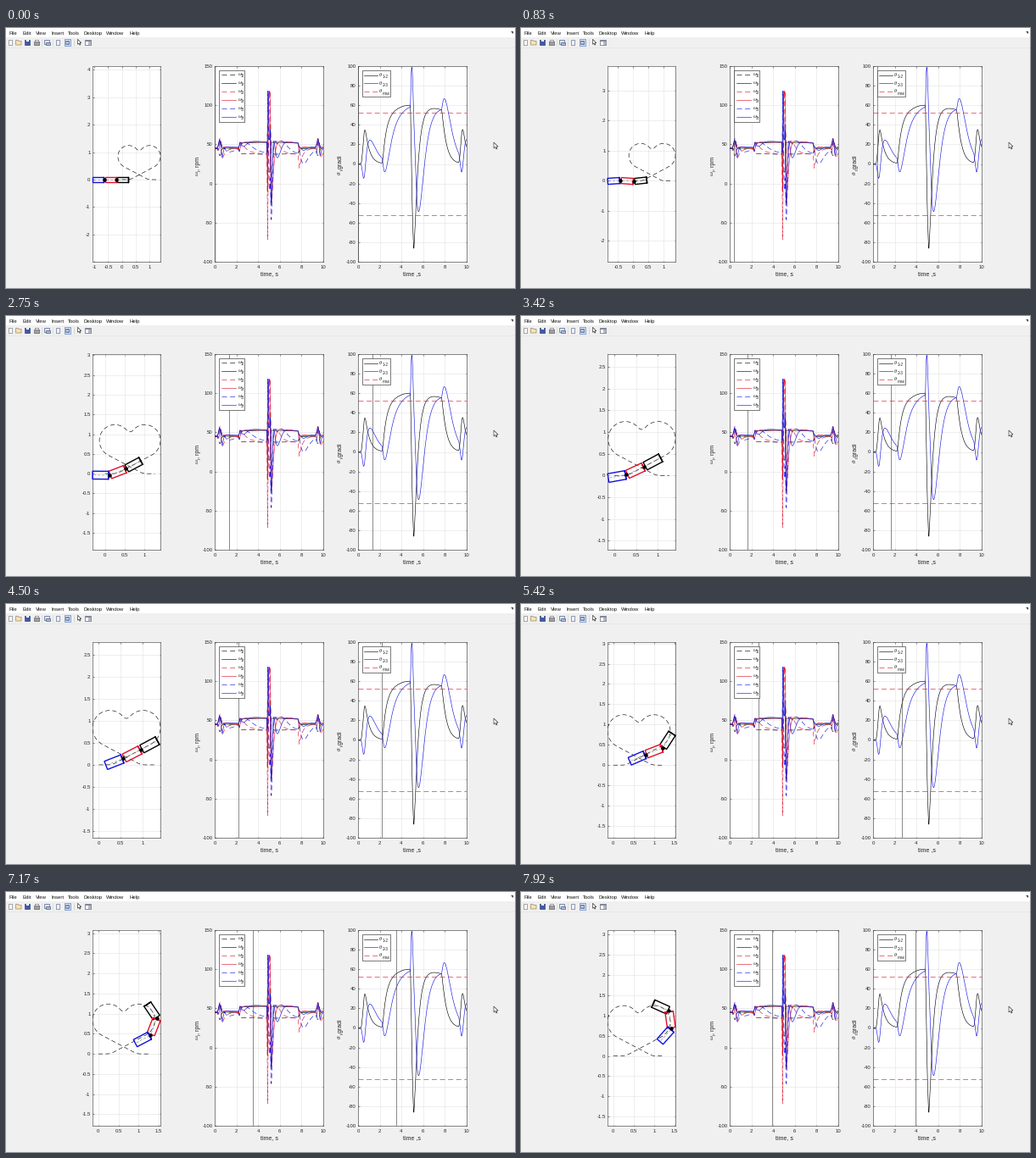
A matplotlib script for the animation above (8 s loop, 600x307 px).

```python
import math

import matplotlib.pyplot as plt
import numpy as np
from matplotlib.animation import FuncAnimation
from matplotlib.patches import Polygon, Rectangle
from matplotlib.ticker import FuncFormatter, MultipleLocator

W, H, DPI = 600, 307, 100
FRAMES, INTERVAL = 100, 80
RATE = 0.495                      # simulated seconds per second shown
PX = 72 / DPI                     # points per pixel

SPEED, RADIUS, HITCH = 0.555, 0.395, 0.225
TRACK, RPM = 0.065, 45 / 0.555
BOX_L, BOX_W = 0.40, 0.20
START = 0.03

BLACK, RED, BLUE = "#000000", "#e0102a", "#1010e0"
INK = "#262626"
CURVE = 0.6                       # curve width in pixels
DASH = (0, (10, 6))

plt.rcParams.update({
    "font.family": "Liberation Sans",
    "axes.unicode_minus": False,
})


# ---- vehicle model -------------------------------------------------------

def bell(x, centre, width):
    d = (x - centre) / width
    return np.where(np.abs(d) < 0.5, (1 + np.cos(2 * np.pi * d)) / width, 0)


def trailer(v, w):
    """Joint angle, speed and turn rate of a cart hitched behind another."""
    u, half_tan = 0.0, np.zeros_like(v)
    for i in range(len(v)):
        half_tan[i] = u
        u += dt * (w[i] - v[i] * u / HITCH)
    th = 2 * np.arctan(half_tan)
    v_next = v * np.cos(th) + HITCH * w * np.sin(th)
    w_next = v * np.sin(th) / HITCH - w * np.cos(th)
    return th, v_next, w_next


def direction(a):
    return np.stack([np.cos(a), np.sin(a)], axis=-1)


t = np.linspace(0, 10, 2001)
dt = t[1] - t[0]
tau = np.abs(t - 5)
corner = math.radians(28)
lobe = np.interp(tau, [0.15, 0.22, 1.0, 2.68, 2.80],
                 [0, 1.02, 1.02, 0.90, 0]) * SPEED / RADIUS
notch = np.interp(tau, [0.13, 0.17], [1, 0])
# the notch turns the cart back so that it crosses the middle heading left
half_turn = corner + lobe[t < 5].sum() * dt - math.pi
notch *= 2 * half_turn / (notch.sum() * dt)

v1 = np.full_like(t, SPEED)
w1 = corner * bell(tau, 4.52, 0.55) + lobe - notch
th12, v2, w2 = trailer(v1, w1)
th23, v3, w3 = trailer(v2, w2)

a1 = np.cumsum(w1) * dt
a2 = a1 - th12
a3 = a2 - th23
p1 = np.cumsum(SPEED * dt * direction(a1), axis=0) + [START, 0]
joint12 = p1 - HITCH * direction(a1)
p2 = joint12 - HITCH * direction(a2)
joint23 = p2 - HITCH * direction(a2)
p3 = joint23 - HITCH * direction(a3)
carts = [(p1, a1, BLACK), (p2, a2, RED), (p3, a3, BLUE)]
path = np.vstack([[0, 0], p1, p1[-1] + [START, 0]])


# ---- figure --------------------------------------------------------------

fig = plt.figure(figsize=(W / DPI, H / DPI), dpi=DPI, facecolor="#f0f0f0")


def panel(x0, x1):
    y0, y1 = 45, 276
    ax = fig.add_axes([x0 / W, 1 - y1 / H, (x1 - x0) / W, (y1 - y0) / H])
    ax.grid(True, color="#e4e4e4", lw=0.6 * PX)
    ax.set_axisbelow(True)
    ax.tick_params(direction="in", top=True, right=True, length=1.5 * PX,
                   width=0.5 * PX, color=INK, labelcolor=INK,
                   labelsize=6 * PX)
    ax.tick_params(axis="x", pad=3.6 * PX)
    ax.tick_params(axis="y", pad=2.5 * PX)
    for side in ax.spines.values():
        side.set(lw=0.6 * PX, color="#404040")
    plain = FuncFormatter(lambda v, _: f"{round(v, 6) + 0.0:g}")
    ax.xaxis.set_major_formatter(plain)
    ax.yaxis.set_major_formatter(plain)
    return ax


def chart(x0, x1, low, high, step):
    ax = panel(x0, x1)
    ax.set(xlim=(0, 10), ylim=(low, high))
    ax.xaxis.set_major_locator(MultipleLocator(2))
    ax.yaxis.set_major_locator(MultipleLocator(step))
    cursor = ax.axvline(0, color="#404040", lw=0.6 * PX, zorder=3)
    return ax, cursor


def curve(ax, x, y, col, style="-"):
    ax.plot(x, y, color=col, ls=style, lw=CURVE * PX)


world = panel(102, 182)
world.xaxis.set_major_locator(MultipleLocator(0.5))
speed_ax, speed_cur = chart(246, 374, -100, 150, 50)
angle_ax, angle_cur = chart(415, 542.5, -100, 100, 20)

speed_keys = []
for n, (v, w, col) in enumerate([(v1, w1, BLACK), (v2, w2, RED),
                                 (v3, w3, BLUE)], 1):
    for side, sign, style in (("l", -1, DASH), ("r", 1, "-")):
        curve(speed_ax, t, RPM * (v + sign * TRACK * w), col, style)
        speed_keys.append(("ω", f"{n}{side}", col, style))

curve(angle_ax, t, np.degrees(th12), BLACK)
curve(angle_ax, t, np.degrees(th23), BLUE)
for level in (52, -52):
    curve(angle_ax, [0, 10], [level, level], RED, DASH)
angle_keys = [("θ", "1-2", BLACK, "-"), ("θ", "2-3", BLUE, "-"),
              ("θ", "max", RED, DASH)]

curve(world, *path.T, BLACK, (0, (8.5, 5.5)))
bodies, axes_lines = [], []
for _, _, col in carts:
    bodies.append(world.plot([], [], color=col, lw=1.4 * PX, zorder=5,
                             solid_joinstyle="miter", clip_on=False)[0])
    axes_lines.append(world.plot([], [], color="#808080", lw=0.6 * PX,
                                 ls=(0, (5, 3)), zorder=4)[0])
bars = [world.plot([], [], color=BLACK, lw=0.9 * PX, zorder=5)[0]
        for _ in range(2)]
pins = world.plot([], [], "o", color=BLACK, ms=3.8 * PX, mew=0.5 * PX,
                  zorder=6)[0]


# ---- window chrome, legends and labels in pixel units --------------------

ui = fig.add_axes([0, 0, 1, 1], zorder=5)
ui.set(xlim=(0, W), ylim=(H, 0))
ui.axis("off")


def rect(x, y, w, h, fill, edge="none", lw=0.6):
    ui.add_patch(Rectangle((x, y), w, h, fc=fill, ec=edge, lw=lw * PX))


def line(xs, ys, col, lw=0.7, style="-"):
    ui.plot(xs, ys, color=col, lw=lw * PX, ls=style)


def poly(points, fill, edge="none", lw=0.6):
    ui.add_patch(Polygon(points, fc=fill, ec=edge, lw=lw * PX))


def label(x, y, s, size=6, ha="left", va="baseline", **kw):
    kw.setdefault("color", INK)
    ui.text(x, y, s, fontsize=size * PX, ha=ha, va=va, **kw)


GREEK = dict(family="Liberation Serif", style="italic")


def pointer(x, y, k, fill):
    shape = [(0, 0), (0, 7), (1.7, 5.5), (2.9, 8), (4, 7.5), (2.9, 5.1),
             (5, 5)]
    poly([(x + k * a, y + k * b) for a, b in shape], fill, "#202020")


def legend(x, y, w, h, row0, seg, text_x, keys):
    rect(x, y, w, h, "white", INK)
    for i, (name, sub, col, style) in enumerate(keys):
        row = row0 + 9.9 * i
        line(seg, [row, row], col, CURVE, style)
        label(text_x, row + 1.2, name, 6, **GREEK)
        label(text_x + 3.6, row + 3.4, sub, 4.7)


def side_label(x, y, name, rest):
    """Upright-running axis label with a dropped index."""
    along = dict(ha="center", va="bottom", rotation=90)
    label(x, y, name, 7, **along, **GREEK)
    label(x + 2.2, y - 5, "i", 5, **along)
    label(x + 0.5, y - 6.2, rest, 7, **along)


rect(0, 0, W, 11, "white")
line([0, W], [23, 23], "#e2e2e2", 0.6)
for x, word in ((3, "File"), (19, "Edit"), (35, "View"), (53, "Insert"),
                (73, "Tools"), (92, "Desktop"), (118, "Window"),
                (145, "Help")):
    label(x, 7.7, word, 6, color="#101010")
poly([(594.5, 4.2), (597.5, 4.2), (597.5, 7.2)], "#404040")

# toolbar
rect(2.5, 13.5, 4.5, 6.5, "white", "#707070")
poly([(11.5, 20), (11.5, 14.5), (14, 14.5), (15, 15.5), (18, 15.5),
      (18, 20)], "#f2e4bc", "#907850")
rect(22, 14, 6, 6, "#4058a8", "#283870")
rect(23.5, 14.2, 3, 2.2, "white")
rect(32.5, 16, 6.5, 3.5, "#a0a0a4", "#505050")
rect(34, 13.5, 3.5, 2.5, "white", "#606060")
rect(45, 14, 6, 4.5, "#dce4f4", "#405080")
rect(47, 16.5, 5, 3.5, "#a8b8d8", "#405080")
rect(59, 13.8, 4, 6.4, "#f0f4fc", "#506088")
rect(68.8, 13.3, 7, 7.4, "#cce4f8", "#5078b0")
rect(70.2, 14.8, 4.2, 4.4, "white", "#405080")
for y in (16.2, 17.9):
    line([71, 73.6], [y, y], "#405080")
pointer(84.5, 13.3, 0.85, "white")
rect(93, 14, 6.5, 6, "white", "#505058")
rect(93, 14, 6.5, 1.5, "#8088a0")
rect(97.2, 15.5, 2.3, 4.5, "#b0b8c8")
for x in (41.5, 55, 80):
    line([x, x], [13, 21], "#d0d0d0", 0.6)

legend(251, 50, 30, 60.5, 55, [253.5, 271], 273.3, speed_keys)
legend(419.5, 50, 33.5, 31, 55.5, [422, 438], 440.2, angle_keys)
label(310.5, 292.5, "time, s", 7, "center")
label(479, 292.5, "time ,s", 7, "center")
side_label(225.5, 174, "ω", ", rpm")
side_label(393.5, 173, "θ", ",gradi")
pointer(575, 135, 1, "white")


# ---- animation -----------------------------------------------------------

def outline(p, a):
    e = direction(a)
    n = np.array([-e[1], e[0]])
    signs = [(1, 1), (1, -1), (-1, -1), (-1, 1), (1, 1), (1, -1)]
    return np.array([p + i * BOX_L / 2 * e + j * BOX_W / 2 * n
                     for i, j in signs])


def update(frame):
    now = RATE * frame * INTERVAL / 1000
    k = int(round(now / dt))

    seen = [path]
    for (p, a, _), body, mid in zip(carts, bodies, axes_lines):
        box = outline(p[k], a[k])
        body.set_data(*box.T)
        e = 0.17 * direction(a[k])
        mid.set_data(*np.array([p[k] - e, p[k] + e]).T)
        seen.append(box)

    joints = np.array([joint12[k], joint23[k]])
    pins.set_data(*joints.T)
    gap = HITCH - BOX_L / 2
    for bar, j, front, rear in zip(bars, joints, (a1, a2), (a2, a3)):
        ends = [j + gap * direction(front[k]), j, j - gap * direction(rear[k])]
        bar.set_data(*np.array(ends).T)

    # tight horizontal limits, equal aspect, vertically centred on the data
    pts = np.vstack(seen)
    (x0, y0), (x1, y1) = pts.min(axis=0), pts.max(axis=0)
    span = (x1 - x0) * 231 / 80
    mid_y = (y0 + y1) / 2
    world.set(xlim=(x0, x1), ylim=(mid_y - span / 2, mid_y + span / 2))
    world.yaxis.set_major_locator(MultipleLocator(1 if span > 6 else 0.5))

    for cur in (speed_cur, angle_cur):
        cur.set_xdata([now, now])
    return []


anim = FuncAnimation(fig, update, frames=FRAMES, interval=INTERVAL,
                     init_func=lambda: update(0), repeat=True, repeat_delay=0,
                     blit=False)
plt.show()
```
